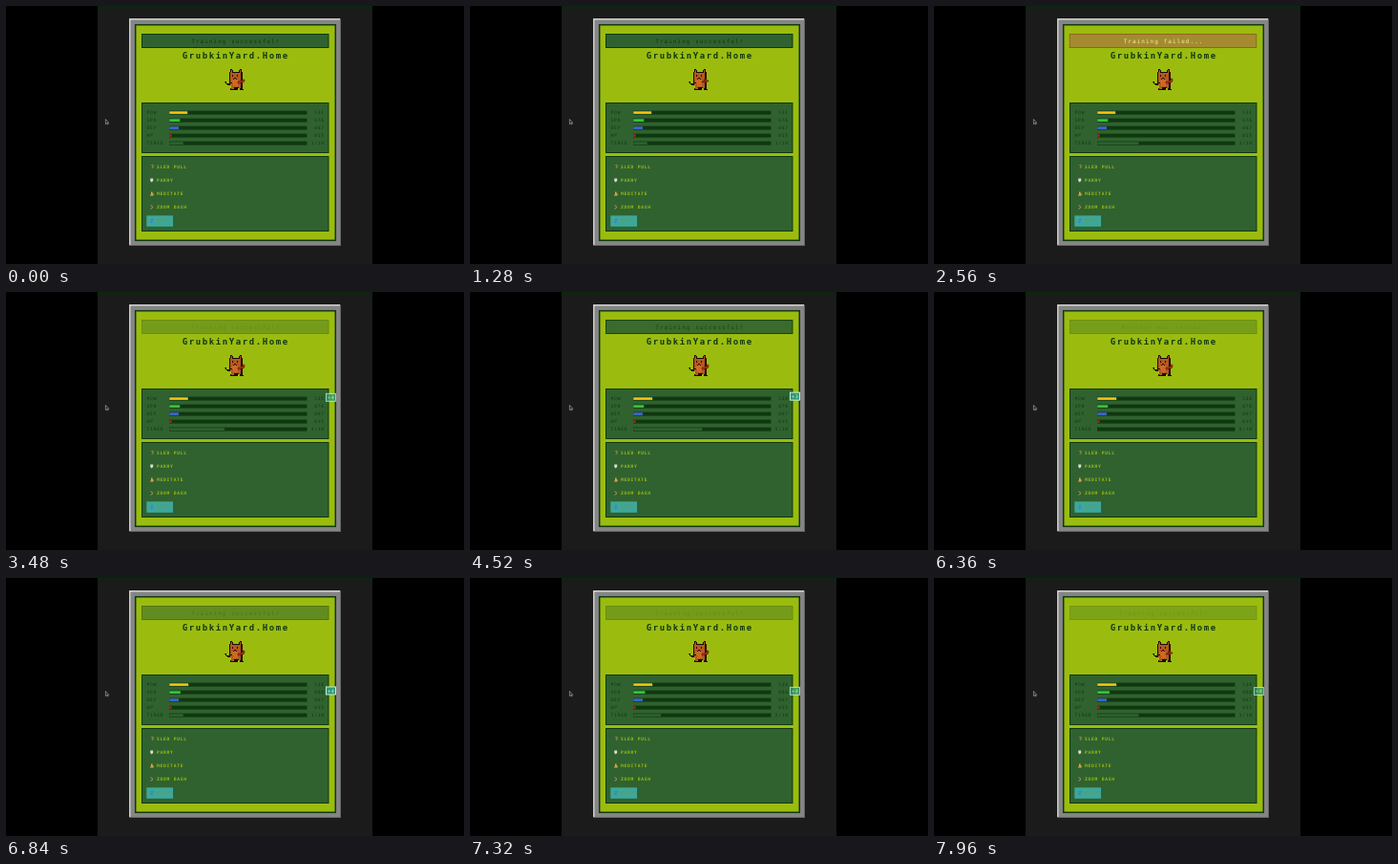
Animation of 480x270 px, one loop 8000 ms. Source, as an HTML page:

```html
<!DOCTYPE html>
<html lang="en">
<head>
<meta charset="utf-8">
<title>Monster training</title>
<style>
  html, body { margin: 0; width: 100%; height: 100%; overflow: hidden; background: #000; }
  svg { display: block; width: 100vw; height: 100vh; }
  text { font-family: "DejaVu Sans Mono", monospace; font-weight: bold; fill: #0f380f; }
  .title { font-size: 9px; letter-spacing: 1.58px; }
  .notice { font-size: 6px; letter-spacing: 1.04px; font-weight: normal; }
  .small { font-size: 4.6px; letter-spacing: .76px; font-weight: normal; }
  .action { fill: #9bbc0f; font-weight: bold; }
  .end { text-anchor: end; }
  .mid { text-anchor: middle; }
  .panel { fill: #306230; stroke: #0f380f; }
</style>
</head>
<body>
<svg viewBox="0 0 480 270">
  <rect x="96" width="288" height="270" fill="#1b1b1b"/>
  <rect x="96" width="288" height="1" fill="#082b0b"/>

  <rect x="129" y="13" width="222" height="238" rx="1.5" fill="#858585"/>
  <path d="M129.8 250V13.8H350" fill="none" stroke="#d2d2d2" stroke-width="1.4"/>
  <path d="M350.5 14V250.5H130" fill="none" stroke="#686868"/>
  <rect x="135.7" y="19.7" width="209.6" height="225.6" fill="#9bbc0f" stroke="#0f380f" stroke-width="1.5"/>

  <g id="notice">
    <rect id="noticeBox" class="panel" x="142.5" y="29.5" width="195.5" height="14"/>
    <text id="noticeText" class="notice mid" x="240.8" y="38.5"></text>
  </g>
  <text class="title mid" x="240.8" y="55.3">GrubkinYard.Home</text>

  <g id="cat">
    <path d="M229 79h2v2h3V69h1v-3h2v1h1v2h6v-2h1v-1h2v3h1v18h1v1h-4v-2h-2v2h-8v-2h1v-3h-4v-1h-1z" fill="#160d06"/>
    <path d="M235 69h1v-2h1v3h8v-3h1v19h-2v-1h-5v2h-3v-4h-1z" fill="#b6581c"/>
    <path d="M237 77h6v7h-5v-3h-1z" fill="#c96b26"/>
    <path d="M237 72h1v2h-1zM242 72h1v2h-1zM239 75h2v1h-2zM238 76h1v1h-1zM241 76h1v1h-1zM235 80h2v1h-2z" fill="#241006"/>
    <path id="arm" stroke="#35100b" stroke-width=".4"/>
  </g>

  <rect class="panel" x="142.5" y="101.5" width="195.5" height="52"/>
  <g id="stats"></g>

  <rect class="panel" x="142.5" y="157.5" width="195.5" height="78"/>
  <rect x="147.3" y="219.3" width="27.7" height="11.5" fill="#3da79b"/>
  <g id="actions"></g>
  <path d="M152.3 166.5h2v2h-1v1.5" fill="none" stroke="#c58a55" stroke-width=".8"/>
  <path d="M151.2 180.5h3v2.5l-1.5 1.5l-1.5-1.5z" fill="#d8dbc9"/>
  <path d="M152 194.5h1.6v1.7h1v2.3h-3.6v-1h1z" fill="#e2a23d"/>
  <path d="M151.5 208.5l2.5 2l-2.5 2" fill="none" stroke="#c9a04b" stroke-width=".9"/>
  <path d="M151.5 223.5h2.6l-2.6 2.8h2.6" fill="none" stroke="#3b79bd" stroke-width=".8"/>

  <g id="popup">
    <rect x="335.5" y="-4.5" width="10" height="8" fill="#329878" stroke="#c2efd0"/>
    <text id="popupText" class="small mid" x="340.9" y="1.3" style="fill:#f0fff0"></text>
  </g>

  <path d="M104.4 118.5v5l1.1-1l.8 1.5l.8-.4l-.7-1.4h1.3z" fill="#111" stroke="#ddd" stroke-width=".5"/>
</svg>

<script>
  const LOOP = 8000, BAR_X = 171, BAR_WIDTH = 144;
  const $ = id => document.getElementById(id);
  const clamp = v => Math.max(0, Math.min(1, v));

  function add(parent, tag, attrs, content = '') {
    const node = document.createElementNS('http://www.w3.org/2000/svg', tag);
    for (const key in attrs) node.setAttribute(key, attrs[key]);
    node.textContent = content;
    return parent.appendChild(node);
  }

  const rows = [
    ['POW', '#f5c518'], ['SPD', '#35c93f'], ['DEF', '#4167d8'], ['HP', '#b32a20'], ['TIRED', '#306230']
  ].map(([label, color], i) => {
    const y = 111.6 + 8 * i, stats = $('stats');
    add(stats, 'text', { class: 'small', x: 147.6, y: y + 1.7 }, label);
    add(stats, 'rect', { x: BAR_X, y: y - 2, width: BAR_WIDTH + .5, height: 4, fill: '#0f380f' });
    const fill = add(stats, 'rect', { x: BAR_X + .3, y: y - 1.3, height: 2.6, fill: color });
    const value = add(stats, 'text', { class: 'small end', x: 333.8, y: y + 1.7 });
    return { fill, value, y };
  });

  ['SLED PULL', 'PARRY', 'MEDITATE', 'ZOOM DASH', 'REST'].forEach((label, i) => {
    const text = add($('actions'), 'text', { class: 'small action', x: 158, y: 169.9 + 14.1 * i }, label);
    if (label === 'REST') text.style.fill = '#679d48';
  });

  const success = 'Training successful!';
  const events = [
    { at: -4000, text: success, pow: 131, spd: 76, tired: 1 },
    { at: 2440, text: 'Training failed...', pow: 131, spd: 76, tired: 3, failed: true },
    { at: 3200, text: success, pow: 135, spd: 76, tired: 4, gain: 4, row: 0 },
    { at: 3800, text: success, pow: 138, spd: 76, tired: 5, gain: 3, row: 0 },
    { at: 6100, text: 'Monster has rested!', pow: 138, spd: 76, tired: 0 },
    { at: 6420, text: success, pow: 138, spd: 80, tired: 1, gain: 4, row: 1 },
    { at: 7040, text: success, pow: 138, spd: 84, tired: 2, gain: 4, row: 1 },
    { at: 7740, text: success, pow: 138, spd: 88, tired: 3, gain: 4, row: 1 }
  ];

  const armOut = 'M243 79h3v-1h2v-2h2v3h-1v1h-3v1h-3z';
  const armDown = 'M243 79h2v-1h3v-1h2v2h-1v1h-3v1h-3z';
  const armIn = 'M243 79h2v-2h2v-1h1v2h2v1h-2v2h-1v-1h-4z';

  function armPose(t) {
    const phase = (t + 440) % 960;
    if (phase >= 720) return [armIn, '#922719'];
    return phase >= 270 && phase < 520 ? [armDown, '#c52a20'] : [armOut, '#c52a20'];
  }

  function showStats({ pow, spd, tired }) {
    const values = [pow, spd, 67, 15, tired];
    rows.forEach(({ fill, value }, i) => {
      const isTired = i === 4;
      fill.setAttribute('width', BAR_WIDTH * values[i] / (isTired ? 10 : 999));
      value.textContent = isTired ? `${tired}/10` : String(values[i]).padStart(3, '0');
    });
  }

  function showNotice({ text, failed }, age) {
    const shake = failed && age < 520 ? -1.2 * Math.sin(age / 260 * 2 * Math.PI) *  (1 - age / 700) : 0;
    $('notice').setAttribute('transform', `translate(${shake} 0)`);
    $('notice').setAttribute('opacity', failed ? 1 : clamp(age / 800));
    $('noticeText').textContent = text;
    $('noticeText').style.fill = failed ? '#f3edaa' : '#0f380f';
    $('noticeBox').style.fill = failed ? '#a58b30' : '#306230';
    $('noticeBox').style.stroke = failed ? '#8c671d' : '#0f380f';
  }

  function showPopup({ gain, row }, age) {
    const visible = gain && age < 2000;
    $('popup').setAttribute('opacity', visible ? Math.min(clamp(.4 + age / 700), clamp((2000 - age) / 1000)) : 0);
    if (!visible) return;
    $('popup').setAttribute('transform', `translate(0 ${rows[row].y - age * .0027})`);
    $('popupText').textContent = `+${gain}`;
  }

  function draw() {
    const t = performance.now() % LOOP;
    const event = events.filter(e => e.at <= t).pop();
    const age = t - event.at;
    const [shape, color] = armPose(t);
    $('arm').setAttribute('d', shape);
    $('arm').setAttribute('fill', color);
    showStats(event);
    showNotice(event, age);
    showPopup(event, age);
    requestAnimationFrame(draw);
  }
  draw();
</script>
</body>
</html>
```
